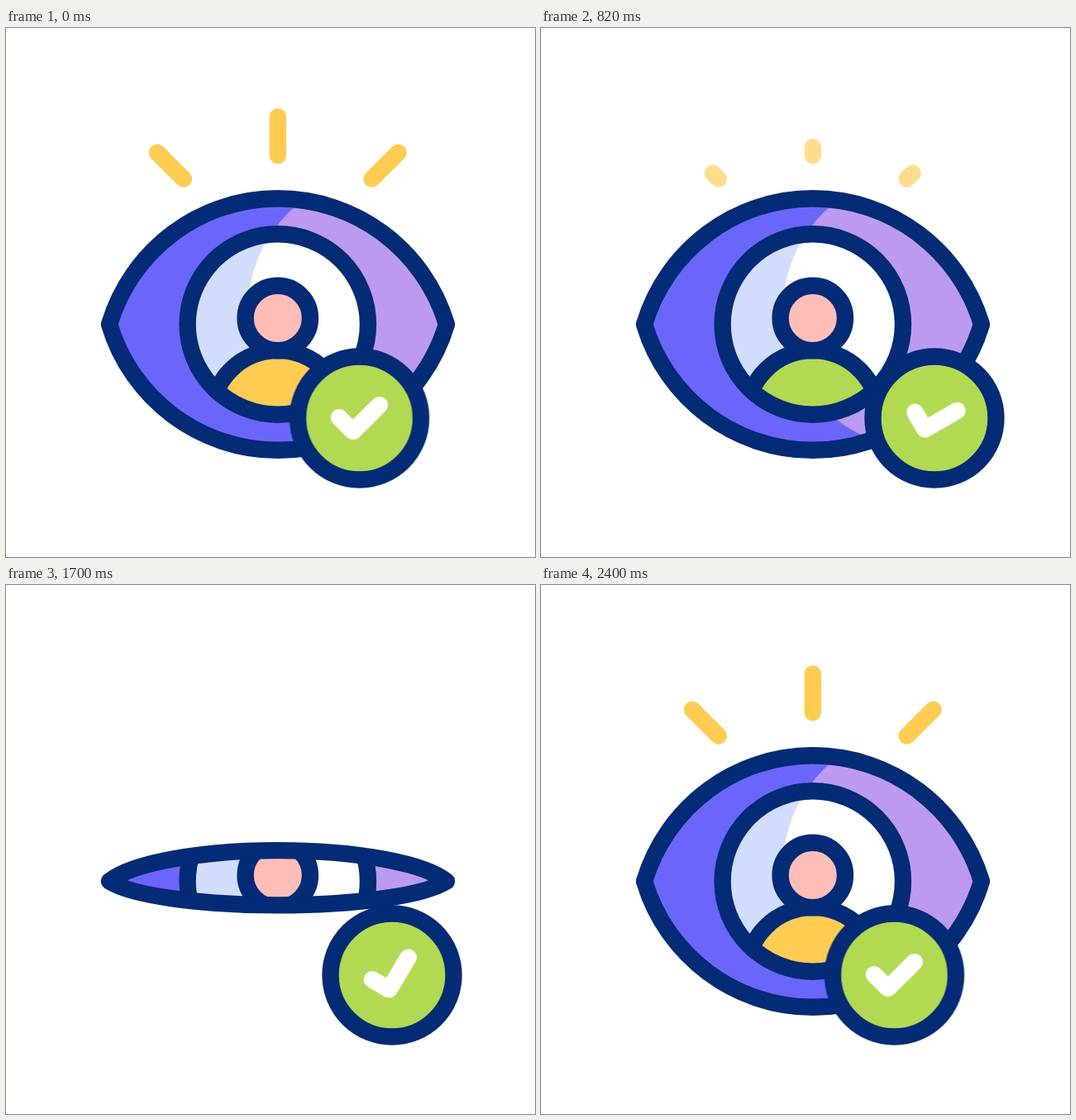
Animation of 640 by 640 pixels, one loop 2.42 s. Source, as an HTML page:

```html
<!DOCTYPE html>
<html lang="en">
<head>
<meta charset="utf-8">
<title>Eye check</title>
<style>
  html, body { margin: 0; width: 100%; height: 100%; overflow: hidden; background: #fff; }
  svg { display: block; width: 100vw; height: 100vh; }

  .line { stroke: #042b76; stroke-width: 20.4; stroke-linecap: round; stroke-linejoin: round; }
  .none { fill: none; }

  .lid, .ray, .body, .badge, .tick {
    animation: 2420ms cubic-bezier(.3333, 0, .6667, 1) infinite;
  }
  .lid   { animation-name: blink; }
  .ray   { animation-name: trim, fade; stroke: #ffcb50; stroke-width: 20.4;
           stroke-linecap: round; stroke-dasharray: 1 3; }
  .body  { animation-name: shirt; animation-timing-function: step-end; }
  .badge { animation-name: slide; }
  .tick  { animation-name: rock; }

  /* Two 1200 ms blinks, then a 20 ms rest */
  @keyframes blink {
    0%, 33.058%, 49.587%, 82.645%, 100% {
      d: path("M125 358.5C152 268 235 206.3 328.9 206.3C423 206.3 506 268 533 358.5C506 449 423 510.8 328.9 510.8C235 510.8 152 449 125 358.5Z");
    }
    16.529%, 66.116% {
      d: path("M125 358.5C152 349.3 235 342.9 328.9 342.9C423 342.9 506 349.3 533 358.5C506 361.8 423 364 328.9 364C235 364 152 361.8 125 358.5Z");
    }
  }
  /* Rays leave through the tip and grow back from the base */
  @keyframes trim {
    0%, 45.455%, 49.587%, 95.041%, 100% { stroke-dashoffset: 0; }
    16.529%, 66.116% { stroke-dashoffset: -1; animation-timing-function: step-end; }
    28.926%, 78.512% { stroke-dashoffset: 1; }
  }
  @keyframes fade {
    0%, 8.264%, 37.19%, 57.851%, 86.777%, 100% { opacity: 1; }
    16.529%, 28.926%, 66.116%, 78.512% { opacity: 0; }
  }
  @keyframes shirt {
    0%, 66.116%, 100% { fill: #ffcb50; }
    16.529% { fill: #b1da52; }
  }
  @keyframes slide {
    0%, 99.174%, 100% { transform: translate(427.5px, 472px); }
    49.587% { transform: translate(491px, 472px); }
  }
  @keyframes rock {
    0%, 99.174%, 100% { transform: rotate(0deg); }
    33.058% { transform: rotate(15deg); }
    66.116% { transform: rotate(-15deg); }
  }
</style>
</head>
<body>
<svg viewBox="0 0 640 640">
  <defs>
    <clipPath id="eye"><path class="lid"/></clipPath>
    <clipPath id="iris"><circle cx="328.8" cy="358.5" r="109"/></clipPath>
  </defs>

  <path class="ray none" pathLength="1" d="M328.8 154.2V107.4"/>
  <path class="ray none" pathLength="1" d="M215 182.6L183 150.7"/>
  <path class="ray none" pathLength="1" d="M442.6 182.6L474.6 150.7"/>

  <g clip-path="url(#eye)">
    <rect x="100" y="180" width="460" height="360" fill="#6a66fa"/>
    <circle cx="460" cy="341.6" r="167.3" fill="#bd9af2"/>
    <g clip-path="url(#iris)">
      <rect x="210" y="240" width="240" height="240" fill="#d2dcfd"/>
      <circle cx="460" cy="341.6" r="167.3" fill="#fff"/>
      <circle class="body line" cx="328.8" cy="470.6" r="80.5"/>
      <circle class="line" cx="328.8" cy="351" r="39.2" fill="#ffbdb8"/>
    </g>
    <circle class="line none" cx="328.8" cy="358.5" r="109.2"/>
  </g>
  <path class="lid line none"/>

  <g class="badge">
    <circle class="line" r="74.5" fill="#b1da52"/>
    <path class="tick none" d="M-24.5 -.8L-7.7 16L24.4 -15.9" stroke="#fff"
          stroke-width="20.4" stroke-linecap="round" stroke-linejoin="round"/>
  </g>
</svg>
</body>
</html>
```
